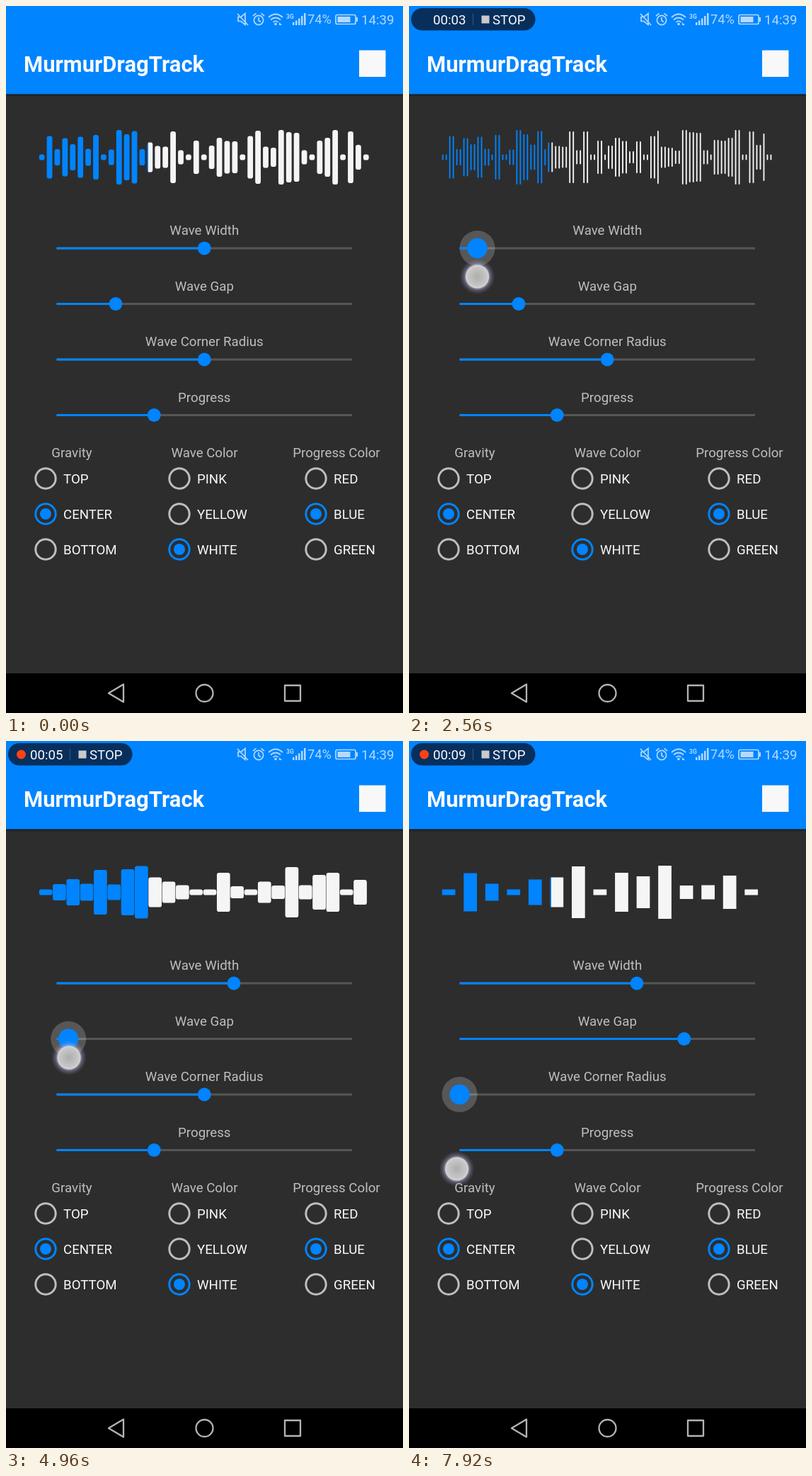
Animation of 561 by 998 pixels, one loop 8000 ms. Source, as an HTML page:

```html
<!DOCTYPE html>
<html lang="en">
<head>
<meta charset="utf-8">
<title>Wave demo</title>
<style>
  html, body { margin: 0; width: 100%; height: 100%; overflow: hidden; background: #2d2d2d; }
  svg { display: block; width: 100%; height: 100%; font-family: Roboto, "Open Sans", sans-serif; font-size: 18.7px; }
  .label { fill: #bebebe; text-anchor: middle; }
  .option { fill: #fafafa; }
  .title { font-size: 31px; font-weight: 700; fill: #fafafa; }
  .status { fill: #b5d9fc; }
  .line { fill: none; stroke: #b5d9fc; stroke-width: 1.7; }
  .nav { fill: none; stroke: #b4b4b4; stroke-width: 2.3; stroke-linejoin: round; }
</style>
</head>
<body>
<svg viewBox="0 0 561 998" preserveAspectRatio="none">
  <defs>
    <linearGradient id="split" gradientUnits="userSpaceOnUse" x1="0" x2="561" y1="0" y2="0">
      <stop offset=".3581" stop-color="#0084ff"/>
      <stop offset=".3581" stop-color="#f5f5f5"/>
    </linearGradient>
    <linearGradient id="shade" x2="0" y2="1">
      <stop offset="0" stop-color="#000" stop-opacity=".4"/>
      <stop offset="1" stop-color="#000" stop-opacity="0"/>
    </linearGradient>
    <radialGradient id="glow">
      <stop offset=".6" stop-color="#e4e4ff" stop-opacity=".75"/>
      <stop offset=".78" stop-color="#b0b0e0" stop-opacity=".3"/>
      <stop offset="1" stop-color="#9090c0" stop-opacity="0"/>
    </radialGradient>
    <radialGradient id="finger">
      <stop offset="0" stop-color="#adadad"/>
      <stop offset=".8" stop-color="#c6c6c6"/>
      <stop offset="1" stop-color="#d6d6d6"/>
    </radialGradient>
  </defs>

  <rect width="561" height="998" fill="#2d2d2d"/>
  <rect width="561" height="124.5" fill="#0084ff"/>
  <rect y="124.5" width="561" height="4" fill="url(#shade)"/>
  <text class="title" x="25" y="93">MurmurDragTrack</text>
  <rect x="499" y="62.5" width="37.5" height="37.5" fill="#f8f8f8"/>

  <!-- status bar -->
  <g class="line">
    <path d="M328 15.5h4l6-5v16l-6-5h-4zM327 11l15 16"/>
    <circle cx="357" cy="20" r="6.6"/>
    <path d="M357 16v4.5l3 2M349 14l4.5-3.6M365 14l-4.5-3.6"/>
    <path d="M371 16q10-9 20 0M374 19.500q7-6 14 0M377.500 22.800q3.500-3 7 0"/>
    <rect x="466" y="12.500" width="28" height="13" rx="2"/>
  </g>
  <g class="status">
    <circle cx="381" cy="25.500" r="1.800"/>
    <path d="M386 23l4 4h-4zM468.500 15h18v8h-18zM495 16h2v6h-2z"/>
    <path d="M405 23h2.500v4h-2.500zM409 20.500h2.500v6.500h-2.500zM413 17.500h2.500v9.500h-2.500zM417 14h2.500v13h-2.500zM421 10h2.500v17h-2.500z"/>
    <text x="396" y="17.500" font-size="8.500" font-weight="700">3G</text>
    <text x="426" y="24.500" font-size="18.300">74%</text>
    <text x="502" y="26" font-size="18.700">14:39</text>
  </g>

  <g id="pill">
    <rect x="3" y="3" width="175.500" height="31.500" rx="15.750" fill="#082f5c"/>
    <circle id="dot" cx="21.500" cy="19" r="6.500" fill="#ff4212"/>
    <text id="clock" class="option" x="34" y="26"></text>
    <path d="M90.500 11v16" stroke="#2c5279" stroke-width="1.300"/>
    <rect x="102.500" y="13.500" width="11" height="11" fill="#cacaca"/>
    <text class="option" x="118" y="26">STOP</text>
  </g>

  <path id="wave" fill="url(#split)"/>
  <g id="controls"></g>
  <g id="touch">
    <circle r="25" fill="url(#glow)"/>
    <circle r="16.500" fill="url(#finger)"/>
  </g>

  <rect y="942" width="561" height="56" fill="#000"/>
  <g class="nav">
    <path d="M145 970l21-12.500v25z"/>
    <circle cx="280.500" cy="970" r="12"/>
    <rect x="394" y="959" width="22" height="22"/>
  </g>
</svg>

<script>
const LOOP = 8000, STEP = 80;
const LEFT = 71.5, SPAN = 417.5;         // slider track
const PX = 561 / 1080;                   // device pixel on this stage
const ROOM = 900, WAVE_X = 90 * PX, WAVE_Y = 213.5, MIN_H = 8;

const samples = [
  8, 60, 23, 54, 37, 58, 24, 8, 63, 8, 22, 77, 65, 36, 74, 23, 42,
  32, 30, 73, 20, 73, 8, 47, 8, 33, 55, 46, 17, 45, 8, 60, 75, 30,
  27, 19, 77, 71, 69, 20, 8, 49, 47, 55, 77, 8, 73, 35, 67, 8
];

// value: slider position over time; touch: finger height while pressed
const sliders = [
  { name: "Wave Width", y: 342, down: 400, up: 3840, dx: 0,
    value: [[480, .5], [1440, .14], [2000, .08], [2400, .06], [2640, .06], [3680, .6]],
    touch: [[400, 358], [1440, 374], [2560, 382], [3840, 386]] },
  { name: "Wave Gap", y: 420.5, down: 4320, up: 6320, dx: .8,
    value: [[4400, .2], [4960, .04], [5120, .02], [6080, .75], [6240, .76]],
    touch: [[4320, 438], [4960, 447], [6080, 461], [6320, 462]] },
  { name: "Wave Corner Radius", y: 499, down: 6880, up: LOOP, dx: -4,
    value: [[6960, .5], [7680, 0]],
    touch: [[6880, 530], [7920, 604]] },
  { name: "Progress", y: 577.5, value: [[0, .33]] }
];

const groups = [
  { name: "Gravity", mid: 93, x: 56, on: 1, items: ["TOP", "CENTER", "BOTTOM"] },
  { name: "Wave Color", mid: 280.5, x: 245, on: 2, items: ["PINK", "YELLOW", "WHITE"] },
  { name: "Progress Color", mid: 467, x: 438, on: 1, items: ["RED", "BLUE", "GREEN"] }
];

const $ = id => document.getElementById(id);
const show = (el, on) => el.setAttribute("visibility", on ? "visible" : "hidden");
const set = (el, attrs) => { for (const k in attrs) el.setAttribute(k, attrs[k]); };

function at(keys, t) {
  if (t <= keys[0][0]) return keys[0][1];
  for (let i = 1; i < keys.length; i++) {
    const [t0, a] = keys[i - 1], [t1, b] = keys[i];
    if (t < t1) {
      const u = (t - t0) / (t1 - t0);
      return a + (b - a) * u * u * (3 - 2 * u);
    }
  }
  return keys[keys.length - 1][1];
}

function build() {
  let html = "";
  for (const s of sliders) {
    html += `<text class="label" x="280.3" y="${s.y - 19}">${s.name}</text>
      <g class="slider">
        <rect x="${LEFT}" y="${s.y - 1.5}" width="${SPAN}" height="3" fill="#565656"/>
        <circle cy="${s.y}" r="25" fill="#fff"/>
        <rect x="${LEFT}" y="${s.y - 1.5}" height="3" fill="#0084ff"/>
        <circle cy="${s.y}" fill="#0084ff"/>
      </g>`;
  }
  for (const g of groups) {
    html += `<text class="label" x="${g.mid}" y="637">${g.name}</text>`;
    g.items.forEach((item, i) => {
      const y = 667 + 50 * i, on = i === g.on;
      html += `<circle cx="${g.x}" cy="${y}" r="14.2" fill="none" stroke-width="3" stroke="${on ? "#0084ff" : "#bebebe"}"/>`;
      if (on) html += `<circle cx="${g.x}" cy="${y}" r="8" fill="#0084ff"/>`;
      html += `<text class="option" x="${g.x + 25}" y="${y + 7}">${item}</text>`;
    });
  }
  $("controls").innerHTML = html;
  document.querySelectorAll(".slider").forEach((el, i) => {
    const [, halo, fill, thumb] = el.children;
    Object.assign(sliders[i], { halo, fill, thumb });
  });
}

function bar(x, w, h, radius) {
  const r = Math.min(radius, w / 2, h / 2);
  const arc = (dx, dy) => `a${r} ${r} 0 0 1 ${dx} ${dy}`;
  const a = w - 2 * r, b = h - 2 * r;
  return `M${x + r} ${WAVE_Y - h / 2}h${a}${arc(r, r)}v${b}${arc(-r, r)}h${-a}${arc(-r, -r)}v${-b}${arc(r, -r)}z`;
}

function wavePath(width, gap, radius) {
  const pitch = width + gap;
  // single precision decides which sample a bar picks at whole numbers
  const step = Math.fround(samples.length * pitch / ROOM);
  let d = "", pos = 0;
  for (let x = 0; pos < samples.length && x + width <= ROOM + .01; x += pitch) {
    const h = Math.max(MIN_H, samples[Math.floor(pos)]);
    d += bar(WAVE_X + x * PX, width * PX, h, radius * PX);
    pos = Math.fround(pos + step);
  }
  return d;
}

function draw(t) {
  let finger = null;
  const values = sliders.map(s => {
    const v = at(s.value, t), x = LEFT + SPAN * v;
    const pressed = t >= s.down && t < s.up;
    const fade = t >= s.up ? Math.max(0, 1 - (t - s.up) / 200) : 0;
    const grow = pressed ? Math.min(1, (t - s.down + STEP) / 160) : 0;
    set(s.fill, { width: x - LEFT });
    set(s.thumb, { cx: x, r: 9.4 + 4.8 * grow });
    set(s.halo, { cx: x, "fill-opacity": pressed ? .2 * grow : .11 * fade });
    if (pressed) finger = [x + s.dx, at(s.touch, t)];
    return v;
  });

  const width = t < sliders[0].down ? 15 : 60 * values[0];
  $("wave").setAttribute("d", wavePath(width, 30 * values[1], 12 * values[2]));

  show($("touch"), finger);
  if (finger) set($("touch"), { transform: `translate(${finger})` });

  // the recorded clock runs a little faster than the loop
  const sec = t * 1.15 / 1000 + .15;
  show($("pill"), t >= STEP);
  show($("dot"), t >= STEP && sec % 1 >= .2);
  $("clock").textContent = "00:0" + Math.floor(sec);
}

build();
const start = performance.now();
function tick() {
  const t = (performance.now() - start) % LOOP;
  draw(Math.floor(t / STEP) * STEP);
  requestAnimationFrame(tick);
}
tick();
</script>
</body>
</html>
```
